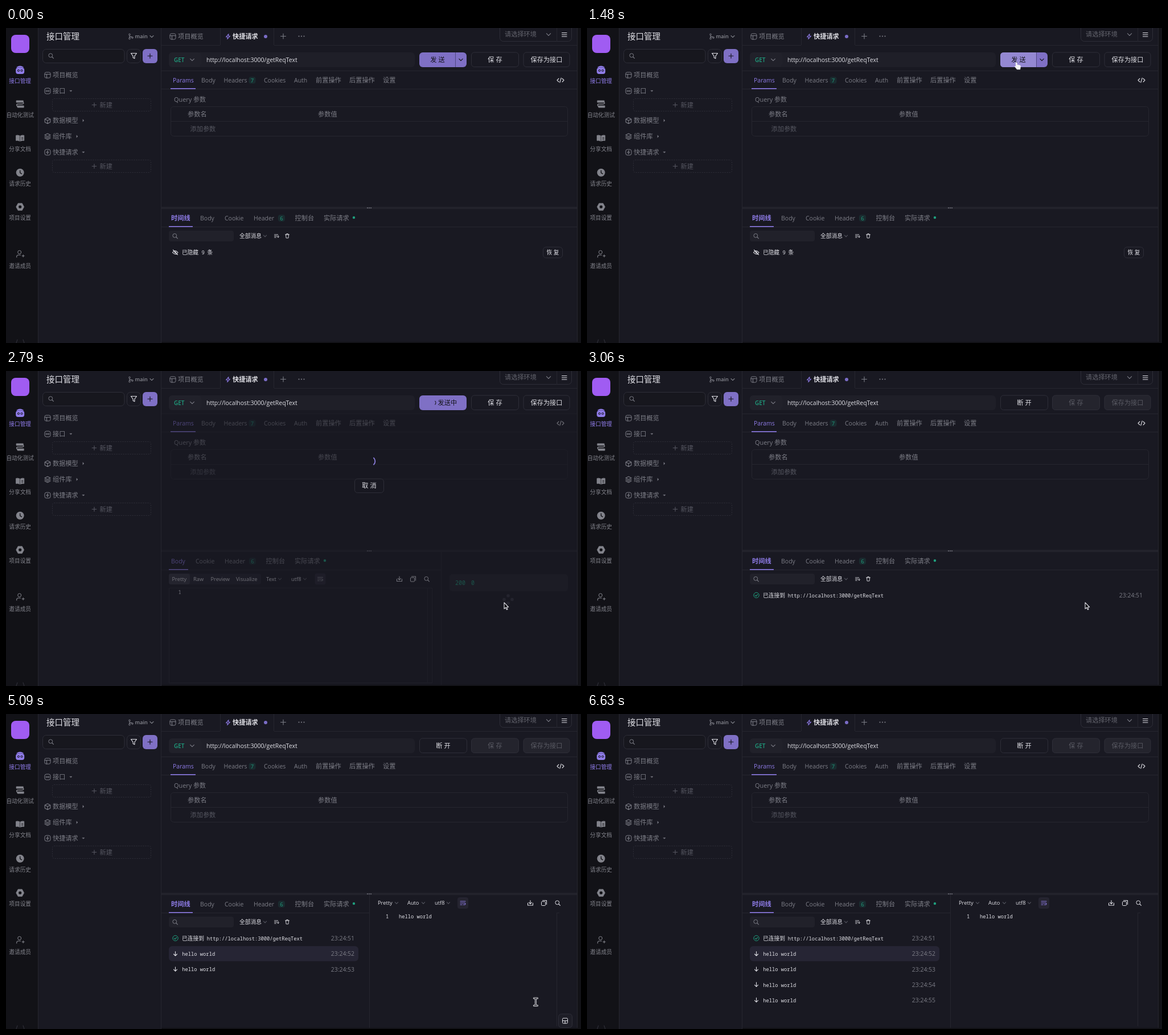
Write an HTML page that moves like this. It is 1010 px wide and 555 px high and loops after 7380 ms.

```html
<!DOCTYPE html>
<html lang="zh-CN">
<head>
<meta charset="utf-8">
<title>接口管理</title>
<style>
html, body { margin: 0; width: 100%; height: 100%; overflow: hidden; background: #191922; }
svg { display: block; width: 100vw; height: 100vh; }
text { font-family: "Open Sans", "Noto Sans CJK SC", "Noto Sans CJK", sans-serif; white-space: pre; }
.mono { font-family: "Noto Sans Mono", "Noto Sans CJK SC", "Noto Sans CJK", monospace; }
</style>
</head>
<body>
<svg id="stage" viewBox="0 0 1010 555"></svg>
<script>
const BG = '#191922', DARK = '#121217', LINE = '#26262f', EDGE = '#2e2e38', FIELD = '#21212a';
const WHITE = '#dfdfe5', GREY = '#7c7d86', FAINT = '#555660', PURPLE = '#8f7ce8', FILL = '#7f70c5', GREEN = '#1f9f7e';

// y is the optical middle of the line
const T = (x, y, s, fill = GREY, o = {}) => {
  const size = o.size || (/[^\x00-\x7f]/.test(s) ? 11.2 : 10.5);
  return `<text x="${x}" y="${y + size * .37}" fill="${fill}" font-size="${size}" font-weight="${o.bold || 400}"` +
    ` text-anchor="${o.anchor || 'start'}" class="${o.mono ? 'mono' : ''}">${s}</text>`;
};
const M = (x, y, s, fill = WHITE, size = 8.77) => T(x, y, s, fill, { size, mono: 1 });
const R = (x, y, w, h, fill = 'none', r = 0, stroke = 'none', extra = '') =>
  `<rect x="${x}" y="${y}" width="${w}" height="${h}" rx="${r}" fill="${fill}" stroke="${stroke}" ${extra}/>`;
const P = (d, stroke = GREY, w = 1.1, fill = 'none') =>
  `<path d="${d}" stroke="${stroke}" stroke-width="${w}" fill="${fill}" stroke-linecap="round" stroke-linejoin="round"/>`;
const C = (x, y, r, fill = 'none', stroke = 'none') => `<circle cx="${x}" cy="${y}" r="${r}" fill="${fill}" stroke="${stroke}"/>`;
const G = (id, ...parts) => `<g id="${id}">${parts.join('')}</g>`;
const at = (x, y, s) => `<g transform="translate(${x} ${y})">${s}</g>`;

const hLine = (x, y, w) => R(x, y, w, 1, LINE);
const vLine = (x, y, h) => R(x, y, 1, h, LINE);
const chevron = (x, y, c = GREY, s = 3) => P(`M${x - s} ${y - s / 2}l${s} ${s}l${s} ${-s}`, c);
const plus = (x, y, c, r = 4) => P(`M${x - r} ${y}h${2 * r}M${x} ${y - r}v${2 * r}`, c);
const lens = (x, y, c = GREY) => C(x - .7, y - .7, 3.4, 'none', c) + P(`M${x + 2} ${y + 2}l2.4 2.4`, c);
const button = (x, y, w, h, label, c = WHITE, fill = 'none', size) =>
  R(x + .5, y + .5, w, h, fill, 5, EDGE) + T(x + w / 2 + .5, y + h / 2 + .5, label, c, { anchor: 'middle', size });
const badge = (x, y, n) => R(x - 6, y - 6, 12, 12, '#1a2b2f', 4) + T(x, y, n, GREEN, { anchor: 'middle', size: 9.5 });
const wrapIcon = (x, y, c) => R(x - 9.5, y - 10, 19, 20, '#252430', 4) +
  P(`M${x - 4.5} ${y - 3}h9M${x - 4.5} ${y}h8q2 1.5 0 3h-3M${x - 4.5} ${y + 3}h3`, c);
const tools = (x, y) => P(`M${x - 4.5} ${y}v4h9v-4M${x} ${y - 4.5}v6m-2.5 -2.3l2.5 2.3l2.5 -2.3`, WHITE) +
  R(x + 19.5, y - 2.5, 7, 7, 'none', 1, WHITE) + P(`M${x + 21.5} ${y - 4.5}h7v7`, WHITE) + lens(x + 48, y, WHITE);
const overviewIcon = (x, y) => R(x - 5, y - 5, 10, 10, 'none', 2.5, GREY) + P(`M${x - 5} ${y - 1.5}h10M${x - 1.5} ${y - 1.5}v6.5`);
const bolt = (x, y, c) => P(`M${x + 1} ${y - 4.5}l-4.5 5.3h3l-.7 3.7l4.7 -5.3h-3z`, c);
const caret = (x, y, right) => P(right ? `M${x - 1} ${y - 2}l2 2l-2 2z` : `M${x - 2} ${y - 1}h4l-2 2z`, GREY, .4, GREY);

const navBar = () => {
  const N = '#82838b';
  const icons = [
    c => P('M-5.5 -4.5q5.5 -4 11 0z', c, 1, c) + R(-7.5, -3.5, 15, 11, c, 4) + C(-2.8, 1.5, 1.6, 'none', DARK) + C(2.8, 1.5, 1.6, 'none', DARK),
    c => R(-7, -6.5, 13, 4, c, 1) + R(-5, 2.5, 12, 4, c, 1) + P('M5 -4q3 4 -2 4h-6q-5 0 -2 4', c, 1.5),
    c => P('M-1 -4.5q-3 -1.5 -6 -.5v9q3 -1 6 .8zM1 -4.5q3 -1.5 6 -.5v9q-3 -1 -6 .8z', c, 1, c) + P('M3 -1h2M3 1.5h2', DARK),
    c => C(0, 0, 7, c) + P('M0 -3.5v4l2.8 1.6', DARK, 1.4),
    c => P('M-3.3 -5.8h6.6l3.2 5.8l-3.2 5.8h-6.6l-3.2 -5.8z', c, 1.5, c) + C(0, 0, 2.6, DARK),
    c => C(-1, -3, 3, 'none', c) + P('M-6 6v-1q0 -3 3 -3h4M3.5 3.5h4M5.5 1.5v4', c)
  ];
  const labels = ['接口管理', '自动化测试', '分享文档', '请求历史', '项目设置', '邀请成员'];
  const rows = labels.map((s, i) => {
    const y = i < 5 ? 73.5 + i * 60.4 : 398, c = i ? N : PURPLE;
    return at(24.7, y, icons[i](c)) + T(24.7, y + (i < 5 ? 19.5 : 21), s, c, { size: 9.7, anchor: 'middle' });
  });
  return R(0, 0, 57, 555, DARK) + vLine(56, 0, 555) + R(9, 12, 32, 32, '#a05cf2', 8) +
    rows.join('') + P('M20 549l-2 6M30 549l2 6', '#303039');
};

const newBox = y => R(81.5, y - 11, 173, 22, 'none', 3, EDGE, 'stroke-dasharray="2 2"') + plus(155, y, FAINT, 3.8) + T(164.5, y, '新建', FAINT);

const tree = () => vLine(272, 0, 555) + T(71, 15, '接口管理', WHITE, { size: 14.5, bold: 500 }) +
  C(217, 11.5, 1.4, 'none', GREY) + C(217, 18.5, 1.4, 'none', GREY) + C(222, 17, 1.3, 'none', GREY) + P('M217 13v4q0 -2 4 -1.5') +
  T(226.5, 15, 'main', '#8b8c94', { size: 9.1, bold: 600 }) + chevron(256, 15) +
  R(64.5, 37.5, 143.5, 24, '#17171e', 6, EDGE) + lens(79, 49) +
  R(212.5, 37.5, 24, 24, 'none', 6, EDGE) + P('M219.5 44.5h10l-3.6 4.8v4.5l-2.8 -1.5v-3z', WHITE) +
  R(240, 37, 26, 25, FILL, 6) + plus(253, 49.3, DARK) +
  overviewIcon(73, 83) + T(82, 83, '项目概览') +
  R(68, 106, 10, 10, 'none', 3, GREY) + C(71.3, 111, 1.2, 'none', GREY) + C(74.8, 111, 1.2, 'none', GREY) + T(82, 111, '接口') + caret(114, 111) +
  newBox(135.5) +
  P('M73 158l4.8 2.5v5.5l-4.8 2.5l-4.8 -2.5v-5.5zM68.2 160.5l4.8 2.5l4.8 -2.5M73 163v5.5') + T(82, 163, '数据模型') + caret(136, 163, 1) +
  P('M73 186l5 2.6l-5 2.6l-5 -2.6zM68 191.3l5 2.6l5 -2.6M68 193.8l5 2.6l5 -2.6') + T(82, 191, '组件库') + caret(125, 191, 1) +
  R(68, 214, 10, 10, 'none', 3, GREY) + at(73, 219, P('M.5 -3l-2.5 3.5h2l-.4 2.6l2.5 -3.4h-2z', GREY, .9)) + T(82, 219, '快捷请求') + caret(136, 219) +
  newBox(243.5);

const header = () => hLine(273, 30, 731) + R(376, 0, 95, 31, BG) + vLine(376, 0, 30) + vLine(470, 0, 30) +
  overviewIcon(293, 15) + T(302, 15, '项目概览') + bolt(390, 15, PURPLE) + T(398, 15, '快捷请求', WHITE, { bold: 700 }) +
  C(456, 15, 3, '#7a6cc6') + plus(487, 14.5, GREY, 4.5) + [514.5, 519, 523.5].map(x => C(x, 14.5, 1.1, GREY)).join('') +
  R(867.5, -10, 126, 33.5, 'none', 6, EDGE) + T(876, 11, '请选择环境', '#63646d') + chevron(953, 11.5, GREY, 3.6) + vLine(967, 0, 24) +
  P('M976.5 8.5h8.5M976.5 11.7h8.5M976.5 15h8.5', WHITE) +
  R(286, 43, 432, 26, '#1f1f28', 6) + R(286, 43, 57, 26, FIELD, 6) +
  T(295, 56, 'GET', GREEN, { size: 10, bold: 600 }) + chevron(327, 56, GREY, 3.4) + T(352, 56, 'http://localhost:3000/getReqText', WHITE);

const request = () => {
  const tabs = [[293, 'Params', PURPLE], [343, 'Body'], [382.5, 'Headers'], [453, 'Cookies'], [506, 'Auth'],
    [544, '前置操作'], [603, '后置操作'], [662, '设置']];
  return hLine(273, 75, 731) + hLine(273, 107, 731) + tabs.map(([x, s, c]) => T(x, 92, s, c)).join('') +
    badge(432.5, 92, '7') + R(289, 106, 44, 1.6, PURPLE) + P('M971 89l-3 3l3 3M977 89l3 3l-3 3M975.2 88l-2.4 8', WHITE) +
    T(295, 126, 'Query 参数', GREY, { size: 10.9 }) + R(289.5, 138.5, 697, 52, 'none', 5, LINE) + hLine(290, 164, 697) +
    T(319, 152, '参数名') + T(548, 152, '参数值') + T(323.5, 178, '添加参数', FAINT) +
    R(273, 315, 731, 4, '#22222b') + [635, 638, 641].map(x => C(x, 317, .9, GREY)).join('');
};

const tailTabs = x => T(x, 335, 'Cookie') + T(x + 51, 335, 'Header') + badge(x + 100, 335, '6') +
  T(x + 123.5, 335, '控制台') + T(x + 174, 335, '实际请求') + C(x + 227, 334, 2.2, GREEN);

const timeline = () => T(290, 335, '时间线', PURPLE, { bold: 700 }) + T(341, 335, 'Body') + tailTabs(384) +
  hLine(273, 350, 731) + R(286, 349, 42, 1.6, PURPLE) + R(286, 357, 114, 19, FIELD, 4) + lens(297, 366.5) +
  T(410, 366.5, '全部消息', WHITE, { size: 9.75 }) + chevron(455, 366.5, FAINT, 2.6) +
  P('M471.5 364h6M471.5 366.5h4M471.5 369h3M478 365.5v3.5m-1.5 -1.5l1.5 1.5l1.5 -1.5', WHITE, .9) +
  P('M490.5 364h7M491.5 364l.5 6h4l.5 -6M492.8 364v-1.5h2.4v1.5', WHITE, .9);

const hiddenRow = () => P('M292.5 395.5q4.5 -6 9.5 0q-4.5 6 -9.5 0M293.5 391l8 8.5', WHITE) + C(297.3, 395.3, 1.3, 'none', WHITE) +
  T(309, 395.5, '已隐藏', WHITE, { size: 9.7 }) + M(343.5, 395.5, '9') + T(353.5, 395.5, '条', WHITE, { size: 9.7 }) +
  button(943, 385.5, 34, 19, '恢 复', WHITE, 'none', 9.7);

const rowY = i => 395.3 + 27.2 * i;
const stamp = (i, x = 612) => T(x, rowY(i), '23:24:5' + (i + 1), GREY, { size: 10.4, anchor: 'end' });
const connectedRow = () => C(297.5, 395, 4.7, 'none', GREEN) + P('M295.3 395.2l1.6 1.6l2.8 -3.2', GREEN) +
  T(309, 395.5, '已连接到', WHITE, { size: 9.75 }) + M(352.8, 395.8, 'http://localhost:3000/getReqText');
const messageRow = i => {
  const y = rowY(i);
  return G('msg' + i, i == 1 ? R(286, 409, 333, 26.5, '#262534', 6) : '',
    P(`M297.5 ${y - 4}v7.5m-3 -3l3 3l3 -3`, WHITE), M(309.3, y + .4, 'hello world'), stamp(i));
};

const picks = (list, y) => list.map(([x, s, cx]) => T(x, y, s, WHITE, { size: 9.3 }) + (cx ? chevron(cx, y, FAINT, 2.6) : '')).join('');
const detail = () => R(638, 320, 365, 233, BG) + vLine(638, 319, 234) +
  picks([[653, 'Pretty', 686], [705, 'Auto', 733], [753, 'utf8', 777]], 333) + wrapIcon(802.5, 333, PURPLE) + tools(921, 333) +
  M(667, 357, '1') + G('content', M(690, 357, 'hello world')) + vLine(967, 350, 200) + hLine(967, 350, 5);

const waiting = () => T(290, 335, 'Body', PURPLE) + tailTabs(333) + hLine(273, 350, 491) + R(286, 349, 34, 1.6, PURPLE) + vLine(764, 319, 234) +
  R(286, 357, 162, 19, '#22222c', 4) + R(286, 357, 37, 19, '#33333f', 4) +
  picks([[291.5, 'Pretty'], [329, 'Raw'], [359.5, 'Preview'], [404, 'Visualize'], [457, 'Text', 481], [501, 'utf8', 525]], 366.5) +
  wrapIcon(552, 366.5, GREY) + tools(691, 366.5) +
  R(286.5, 382.5, 462, 167, 'none', 0, LINE) + vLine(740, 383, 167) + M(302.5, 390, '1') +
  R(779, 358, 208, 30, FIELD, 5) + M(789, 373.5, '200', GREEN, 10) + M(817, 373.5, '0', GREEN, 10) +
  [[0, -6.5], [7, 0], [0, 6.5], [-7, 0]].map(([x, y]) => C(882 + x, 402.5 + y, 2.8, '#34333f')).join('');

const saveButtons = (c, fill) => button(817, 42.5, 83, 25.5, '保 存', c, fill) + button(908.5, 42.5, 81, 25.5, '保存为接口', c, fill);

document.getElementById('stage').innerHTML = [
  R(0, 0, 1010, 555, BG), navBar(), tree(), header(), request(),
  G('idleBar', R(726, 43, 83, 26, FILL, 6), G('hover', P('M789 43H732q-6 0 -6 6v14q0 6 6 6H789z', 'none', 0, '#9488d2')),
    R(789, 43, 1, 26, '#4f4784'), T(758, 56, '发 送', DARK, { anchor: 'middle' }), chevron(799, 56, DARK, 3.2)),
  G('saveOn', saveButtons(WHITE, 'none')),
  G('busyBar', R(726, 43, 83, 26, FILL, 6), T(758.5, 56, '发送中', DARK), G('spinSmall', P('M2.8 -2.8a4 4 0 0 1 0 5.6', DARK))),
  G('liveBar', button(726, 42.5, 83, 25.5, '断 开'), saveButtons('#595a63', '#24242d')),
  G('timeline', timeline()), G('hidden', hiddenRow()),
  G('connected', connectedRow()), G('wideStamp', stamp(0, 976)),
  G('detail', detail(), stamp(0)), [1, 2, 3, 4].map(messageRow).join(''),
  G('waiting', waiting(), R(273, 75, 730, 478, BG, 0, 'none', 'opacity=".55"'),
    G('spin', P('M5.9 -5.9a8.3 8.3 0 0 1 0 11.8', '#8b7ddb', 1.8)), button(612, 189.5, 51, 24.5, '取 消')),
  G('layout', R(970.5, 528.5, 24, 24, '#1e1e27', 5, EDGE), R(977.5, 536, 9, 9, 'none', 1.5, WHITE), P('M977.5 540.5h9M982 540.5v4.5', WHITE)),
  vLine(1003, 0, 555), R(1004, 0, 6, 555, DARK), R(273, 553, 737, 2, DARK),
  G('arrow', P('M0 0V11L2.6 8.7L4.4 12.6L6 11.9L4.4 8H7.7Z', WHITE, 1.1, '#0b0b10')),
  G('hand', P('M-1 .5q1 -1 2 0v3.8l5 1q1.5 .5 1.3 2l-.8 5.2h-5.5l-4 -5q1 -1.2 2 0z', '#f4f4f6', .6, '#f4f4f6')),
  G('beam', P('M-3 -6.5h6M-3 6.5h6M0 -6.5v13', WHITE, 3), P('M-3 -6.5h6M-3 6.5h6M0 -6.5v13', '#0b0b10', 1))
].join('');

const $ = id => document.getElementById(id);
const show = (id, on) => $(id).style.display = on ? '' : 'none';
const place = (id, x, y, turn = 0) => $(id).setAttribute('transform', `translate(${x} ${y}) rotate(${turn})`);

const LOOP = 7380, STEP = 68, SEND = 2650, OPEN = 3060, FIRST = 3600;
const starts = [0, 320, 1070, 1900, SEND, 4880, 5630];
const route = [[320, 815, 540], [600, 798, 330], [860, 765, 119], [1000, 762, 99], [1620, 752, 49], [1900, 752, 49],
  [2180, 806, 143], [2510, 875, 408], [3600, 875, 408], [3601, 876, 410], [4880, 876, 410], [5090, 932, 510], [5560, 988, 535], [5760, 1010, 558]];

// the pointer advances in discrete steps within each stretch of motion
const snap = t => {
  const s = starts.filter(v => v <= t).pop();
  return s + Math.floor((t - s + 5) / STEP) * STEP;
};
const pointer = t => {
  const i = route.findIndex(k => k[0] > t);
  if (i < 1) return null;
  const [t0, x0, y0] = route[i - 1], [t1, x1, y1] = route[i], k = (t - t0) / (t1 - t0);
  return [x0 + (x1 - x0) * k, y0 + (y1 - y0) * k];
};

function draw(t) {
  const idle = t < SEND, busy = !idle && t < OPEN, live = t >= OPEN, got = t >= FIRST;
  const s = snap(t), pos = pointer(s), hover = t >= 1400 && t < 2250;
  show('idleBar', idle); show('busyBar', busy); show('liveBar', live); show('saveOn', !live);
  show('timeline', !busy); show('hidden', idle); show('waiting', busy);
  show('connected', live); show('wideStamp', live && !got); show('detail', got); show('content', t >= 3670);
  [FIRST, 4610, 5630, 6630].forEach((v, i) => show('msg' + (i + 1), t >= v));
  show('layout', (t < 1000 && pos && pos[1] > 319) || (t >= 3130 && t < 5690));
  show('hover', hover);

  const turn = (s - 2786) * .36;
  place('spin', 640, 159, turn);
  place('spinSmall', 751, 56, turn);

  const kind = !pos ? '' : got ? 'beam' : hover ? 'hand' : 'arrow';
  for (const id of ['arrow', 'hand', 'beam']) {
    show(id, id == kind);
    if (id == kind) place(id, ...pos);
  }
}

const begin = performance.now();
(function tick() {
  draw((performance.now() - begin) % LOOP);
  requestAnimationFrame(tick);
})();
</script>
</body>
</html>
```
